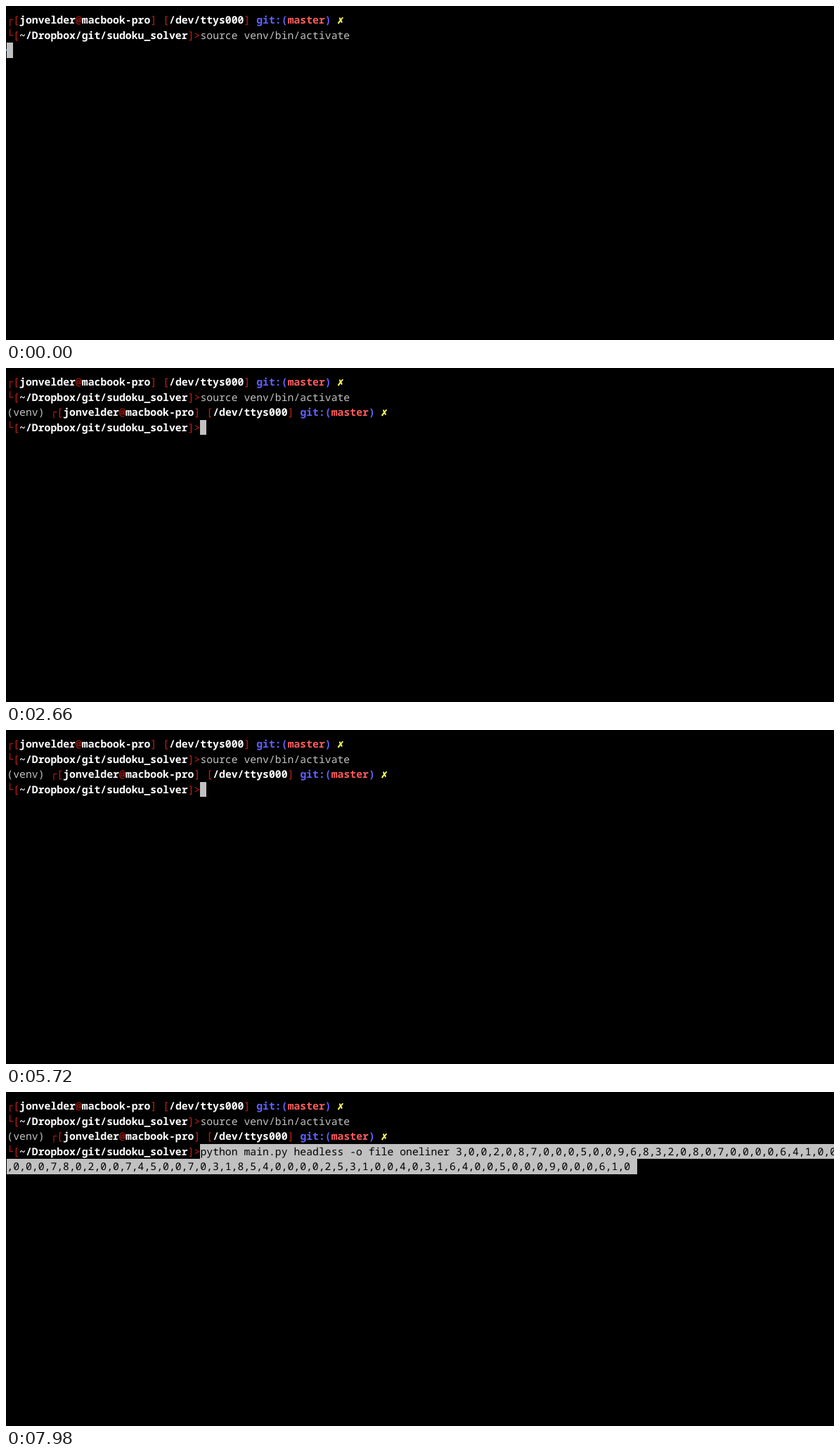
An HTML page for the animation above (8 s loop, 1178 by 475 pixels).

```html
<!DOCTYPE html>
<html lang="en">
<head>
<meta charset="utf-8">
<title>Terminal session</title>
<style>
  html, body { margin: 0; width: 100%; height: 100%; overflow: hidden; background: #000; }
  svg { display: block; width: 1178px; height: 475px; }
  text {
    font: 400 14.79px "Noto Sans Mono", "DejaVu Sans Mono", monospace;
    text-rendering: geometricPrecision;
    white-space: pre;
    fill: #c1c1c1;
  }
  .white, .blue, .coral, .yellow { font-weight: 600; }
  .white { fill: #fff; }
  .red { fill: #c81e12; font-weight: 500; }
  .blue { fill: #6060ff; }
  .coral { fill: #ff5c5c; }
  .yellow { fill: #ffff60; stroke: #ffff60; stroke-width: 0.6px; }
  .dark { fill: #000; }
  .block { fill: #c1c1c1; shape-rendering: crispEdges; }
</style>
</head>
<body>
<svg id="screen" viewBox="0 0 1178 475"></svg>
<script>
const LOOP = 8000, PROMPT_AT = 20, PASTE_AT = 7020;
const LEFT = 1.3, COL = 8.874, TOP = 9, ROW = 21.5, BASE = 16;
const colX = c => LEFT + c * COL;
const rowY = r => TOP + r * ROW;

function add(parent, tag, attrs = {}, text = "") {
  const el = document.createElementNS("http://www.w3.org/2000/svg", tag);
  for (const key in attrs) el.setAttribute(key, attrs[key]);
  el.textContent = text;
  return parent.appendChild(el);
}

// Each run is [class, text], placed on the character grid.
function line(parent, row, col, runs) {
  const el = add(parent, "text", { y: rowY(row) + BASE });
  for (const [cls, text] of runs) {
    add(el, "tspan", { class: cls, x: colX(col) }, text);
    col += text.length;
  }
}

function block(parent, row, col, count) {
  add(parent, "rect", {
    class: "block", x: colX(col), y: rowY(row), width: count * COL, height: ROW
  });
}

// Shows the group only between two times of the loop.
function group(from, to) {
  const g = add(document.getElementById("screen"), "g");
  const steps = [[0, from === 0], [from, true], [to, false], [LOOP, to === LOOP]]
    .filter(([t], i) => !(i === 1 && from === 0) && !(i === 2 && to === LOOP));
  g.animate(
    steps.map(([t, on]) => ({ offset: t / LOOP, opacity: on ? 1 : 0, easing: "step-end" })),
    { duration: LOOP, iterations: Infinity }
  );
  return g;
}

const head = [
  ["red", "┌["], ["white", "jonvelder"], ["red", "@"], ["white", "macbook-pro"], ["red", "]"],
  ["", " "], ["red", "["], ["white", "/dev/ttys000"], ["red", "]"], ["", " "],
  ["blue", "git:("], ["coral", "master"], ["blue", ")"], ["", " "], ["yellow", "✗"]
];
const path = [["red", "└["], ["white", "~/Dropbox/git/sudoku_solver"], ["red", "]>"]];

const base = add(document.getElementById("screen"), "g");
line(base, 0, 0, head);
line(base, 1, 0, [...path, ["", "source venv/bin/activate"]]);

const waiting = group(0, PROMPT_AT);
add(waiting, "rect", { x: 0, y: 61, width: 1, height: 3, fill: "#4a7fb0" });
block(waiting, 2, 0, 1);

const prompt = group(PROMPT_AT, LOOP);
line(prompt, 2, 0, [["", "(venv) "], ...head]);
line(prompt, 3, 0, path);

block(group(PROMPT_AT, PASTE_AT), 3, 31, 1);

const grid = "3002087000500968320807000064100" +
  "00078020074500703185400002531004031640050009000610";
const list = [...grid].join(",");
const paste = group(PASTE_AT, LOOP);
block(paste, 3, 31, 102);
block(paste, 4, 0, 101);
line(paste, 3, 31, [["dark", "python main.py headless -o file oneliner " + list.slice(0, 61)]]);
line(paste, 4, 0, [["dark", list.slice(61)]]);
</script>
</body>
</html>
```
